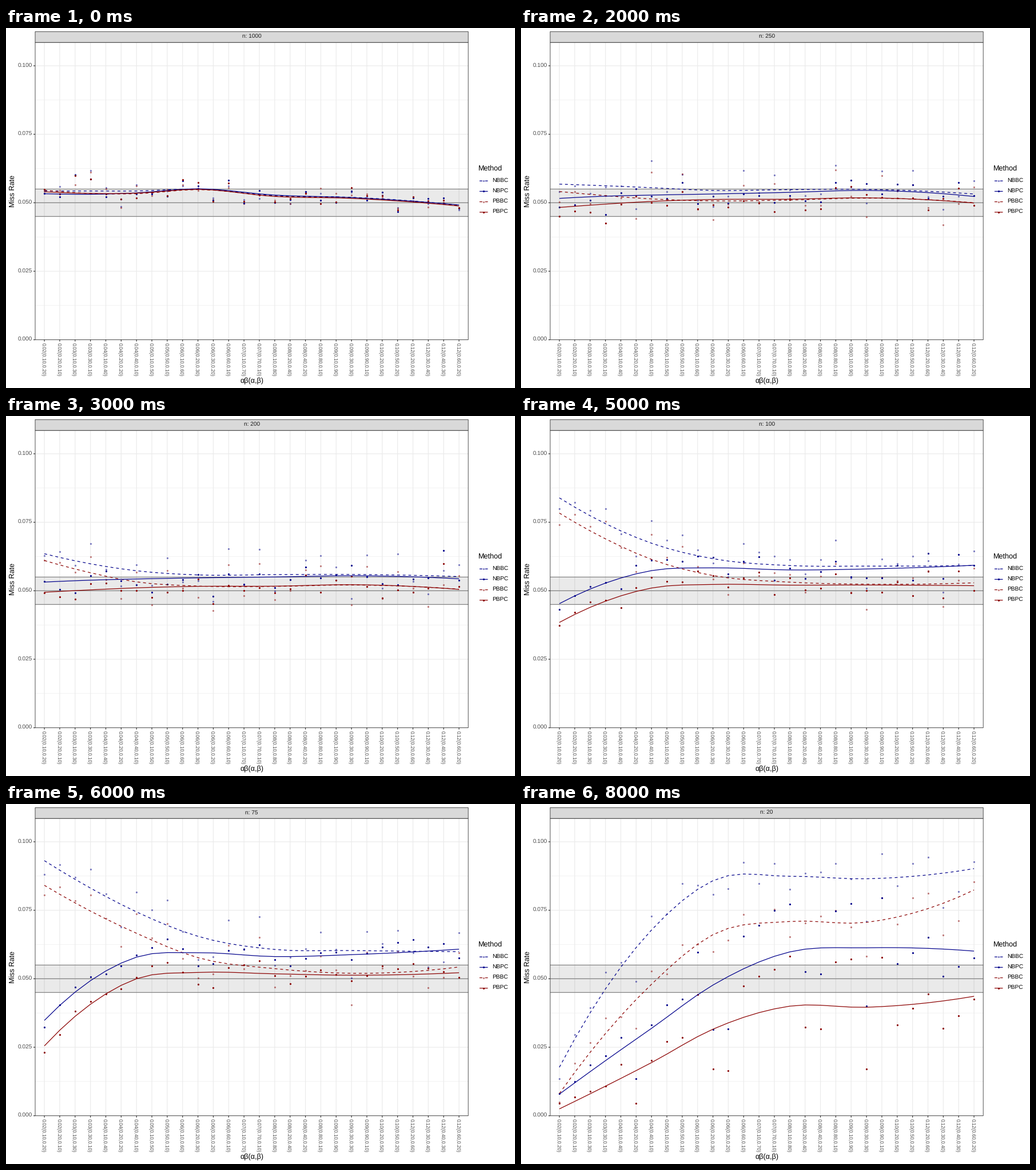
A matplotlib script that plays this animation: 890 px wide and 629 px high, repeating every 9 s.

```python
import numpy as np
import matplotlib.pyplot as plt
from matplotlib.animation import FuncAnimation
from matplotlib.patches import Rectangle

W, H = 890, 629
PX = 0.72                                   # points per pixel at 100 dpi
LEFT, RIGHT, TOP, BOTTOM = 51, 808.2, 25.2, 544.7
NAVY, RED, INK = "#00008b", "#8b0000", "#333333"
SIZES = [1000, 500, 250, 200, 150, 100, 75, 50, 20]
METHODS = [("NBBC", NAVY, True), ("PBBC", RED, True),
           ("NBPC", NAVY, False), ("PBPC", RED, False)]

plt.rcParams.update({"font.family": ["Liberation Sans", "DejaVu Sans"],
                     "path.snap": False, "text.hinting": "none"})

pairs = sorted(((a, b) for a in range(1, 10) for b in range(1, 10)
                if 2 <= a * b <= 12), key=lambda p: (p[0] * p[1], p[0]))
X = np.arange(len(pairs))
xs = LEFT + (X + 0.6) * (RIGHT - LEFT) / (len(X) + 0.2)
skew = np.log([a / b for a, b in pairs])

# Key points of the smoothed curves in units of 0.0001: the NB row, then PB
KNOTS = np.array([0, 3, 6, 10, 15, 20, 27])
BC = {
    1000: [[543, 543, 543, 550, 526, 520, 491],
           [546, 534, 533, 548, 524, 518, 490]],
    250: [[568, 562, 555, 545, 548, 549, 532],
          [541, 526, 514, 507, 510, 517, 500]],
    150: [[747, 659, 603, 579, 577, 577, 585],
          [726, 632, 563, 534, 526, 528, 515]],
    75: [[931, 831, 744, 655, 607, 603, 599],
         [841, 747, 666, 577, 537, 520, 543]],
    50: [[695, 825, 868, 783, 711, 670, 626],
         [545, 709, 772, 689, 601, 561, 536]],
    20: [[177, 463, 678, 858, 874, 865, 902],
         [81, 300, 480, 661, 709, 706, 824]],
}
PC = {
    1000: [[533, 531, 536, 551, 528, 519, 492],
           [540, 534, 535, 549, 523, 516, 488]],
    250: [[516, 524, 528, 532, 538, 545, 523],
          [483, 495, 505, 512, 513, 518, 499]],
    150: [[558, 563, 568, 572, 571, 571, 578],
          [514, 517, 520, 523, 523, 529, 515]],
    75: [[348, 493, 579, 595, 581, 588, 608],
         [255, 407, 500, 523, 518, 513, 522]],
    50: [[177, 407, 555, 629, 644, 649, 606],
         [83, 296, 445, 535, 533, 526, 501]],
    20: [[79, 201, 319, 477, 598, 613, 601],
         [25, 108, 194, 316, 400, 396, 436]],
}


def to_y(v):
    return BOTTOM - 4787 * v


def smooth(values):
    """Cubic Hermite curve through the knots, sampled at every condition."""
    m = np.gradient(values, KNOTS, edge_order=2)
    i = np.clip(np.searchsorted(KNOTS, X, "right") - 1, 0, len(KNOTS) - 2)
    h = KNOTS[i + 1] - KNOTS[i]
    t = (X - KNOTS[i]) / h
    return ((1 + 2 * t) * (1 - t) ** 2 * values[i]
            + t * (1 - t) ** 2 * h * m[i]
            + t * t * (3 - 2 * t) * values[i + 1]
            + t * t * (t - 1) * h * m[i + 1])


def key_points(n):
    """Key points of all methods; missing sizes blend on a 1/n scale."""
    if n in BC:
        return np.array(BC[n] + PC[n], float)
    big = min(k for k in BC if k > n)
    small = max(k for k in BC if k < n)
    w = (1 / n - 1 / big) / (1 / small - 1 / big)
    return (1 - w) * key_points(big) + w * key_points(small)


def scatter(n):
    """Offsets of the dots: balanced conditions sit low, skewed ones high."""
    rng = np.random.default_rng(n)
    bc = 30 - 115 * np.exp(-3 * skew ** 2) + 35 * np.tanh(skew)
    pc = 220 * (20 / n) ** 2 * (np.abs(skew) - 1.15) * np.sin(np.pi * X / 27)
    rule = np.array([bc * min(1, 250 / n), pc])
    shared = rng.normal(0, 24, len(X)) + rng.normal(0, 10, (2, len(X)))
    return np.repeat(rule + shared, 2, axis=0) + rng.normal(0, 8, (4, len(X)))


def build(n):
    lines = np.array([smooth(row) for row in key_points(n)])
    dots = np.maximum(lines + scatter(n), 45)
    return to_y(lines * 1e-4), to_y(dots * 1e-4)


panels = [build(n) for n in SIZES]

fig = plt.figure(figsize=(8.9, 6.29), dpi=100, facecolor="white")
ax = fig.add_axes([0, 0, 1, 1])
ax.set_xlim(0, W)
ax.set_ylim(H, 0)
ax.axis("off")


def stroke(x, y, color, width, **kw):
    return ax.plot(x, y, color=color, lw=width * PX,
                   solid_capstyle="butt", **kw)[0]


def text(x, y, s, size, color="black", ha="center", va="center", **kw):
    return ax.text(x, y, s, fontsize=size * PX, color=color,
                   ha=ha, va=va, **kw)


def curve(x, y, color, dashed, z):
    style = (0, (4, 4)) if dashed else "-"
    return stroke(x, y, color, 1.23, ls=style, dash_capstyle="butt", zorder=z)


def markers(x, y, color, faded, z):
    return ax.plot(x, y, "o", color=color, ms=3.2 * PX, mew=0,
                   alpha=0.5 if faded else 1, zorder=z)[0]


# Grid, acceptance band and frame
for v in (0.0125, 0.0375, 0.0625, 0.0875):
    stroke([LEFT, RIGHT], [to_y(v)] * 2, "#ebebeb", 0.62, zorder=1)
for v in (0, 0.025, 0.05, 0.075, 0.1):
    y = to_y(v)
    stroke([LEFT, RIGHT], [y, y], "#ebebeb", 1.23, zorder=1)
    stroke([LEFT - 3, LEFT], [y, y], INK, 1.2, zorder=1)
    text(46, y, f"{v:.3f}", 10.1, "#4d4d4d", ha="right")
for x, (a, b) in zip(xs, pairs):
    stroke([x, x], [TOP, BOTTOM], "#ebebeb", 1.23, zorder=1)
    stroke([x, x], [BOTTOM, BOTTOM + 3], INK, 1.2, zorder=1)
    text(x - 2.5, 550, f"{a * b / 100:.2f}({a / 10:.2f},{b / 10:.2f})", 8.6,
         "#4d4d4d", va="top", rotation=-90)

ax.add_patch(Rectangle((LEFT, to_y(0.055)), RIGHT - LEFT,
                       to_y(0.045) - to_y(0.055), fc=INK, ec="none",
                       alpha=0.1, zorder=2))
for v in (0.045, 0.05, 0.055):
    stroke([LEFT, RIGHT], [to_y(v)] * 2, "#7f7f7f", 1.2, zorder=3)

for y0, y1, fill in ((TOP, BOTTOM, "none"), (6.3, TOP, "#d9d9d9")):
    ax.add_patch(Rectangle((LEFT, y0), RIGHT - LEFT, y1 - y0, fc=fill,
                           ec=INK, lw=0.85 * PX, zorder=8))

mid = (LEFT + RIGHT) / 2
strip = text(mid, 15.6, "", 10.1, "#1a1a1a", zorder=9)
text(mid, 617, "αβ(α,β)", 12.6)
text(11.5, 285, "Miss Rate", 12.6, rotation=90)

# Data series and legend
text(826, 246, "Method", 12.6, ha="left")
curves, dots = [], []
for name, color, bc in METHODS:
    dots.append(markers(xs, xs, color, bc, 4))
    curves.append(curve(xs, xs, color, bc, 5))
for k, (name, color, bc) in enumerate(sorted(METHODS)):
    y = 267.2 + 18.2 * k
    curve([828, 842.5], [y, y], color, bc, 4)
    markers([835.2], [y], color, bc, 5)
    text(850.5, y, name, 10.1, ha="left")


def update(i):
    line_ys, dot_ys = panels[i]
    for k in range(len(METHODS)):
        curves[k].set_ydata(line_ys[k])
        dots[k].set_ydata(dot_ys[k])
    strip.set_text(f"n: {SIZES[i]}")
    return curves + dots + [strip]


anim = FuncAnimation(fig, update, frames=len(SIZES), interval=1000,
                     init_func=lambda: update(0), repeat=True)
plt.show()
```
